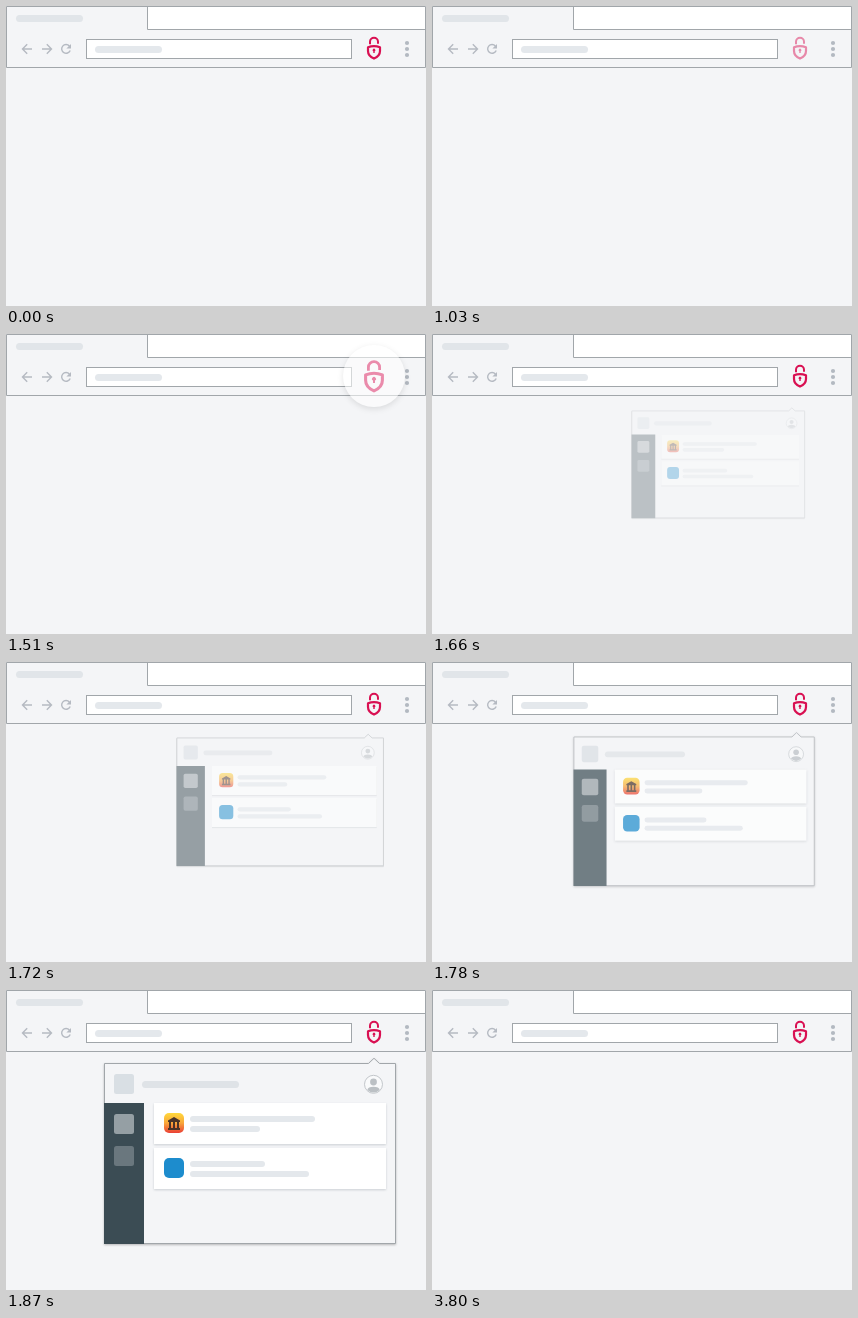
Recreate the animation shown at these times as an HTML page. Size 420 by 300 pixels, loop 3.9 s.

```html
<!DOCTYPE html>
<html lang="en">
<head>
<meta charset="utf-8">
<title>Browser extension popup</title>
<style>
html, body { margin: 0; height: 100%; overflow: hidden; background: #f4f5f7; }
svg { display: block; }
.line { stroke: #a1a6aa; }
.nav { fill: none; stroke: #b5bac2; stroke-width: 1.4; }
.pill { fill: #e4e8ec; }
.card { fill: #fff; filter: drop-shadow(0 1px 1px rgba(60, 75, 85, .22)); }
#halo { fill: #fff; filter: drop-shadow(0 2px 3px rgba(0, 0, 0, .2)); }
#frame { fill: #f4f5f7; filter: drop-shadow(0 1px 1px rgba(0, 0, 0, .25)); }
</style>
</head>
<body>
<svg width="420" height="300" viewBox="0 0 420 300">
  <defs>
    <linearGradient id="sunset" x2="0" y2="1">
      <stop stop-color="#ffd93b"/>
      <stop offset=".5" stop-color="#f9a63a"/>
      <stop offset="1" stop-color="#ea3f35"/>
    </linearGradient>
  </defs>

  <!-- browser window -->
  <path fill="#fff" d="M142 1H419V23H142z"/>
  <path class="line" fill="none" d="M.5 .5H419.5V61.5H.5zM141.5 .5V23.5H419.5"/>
  <rect class="pill" x="10" y="9" width="67" height="7" rx="3.5" style="fill:#e1e5e9"/>
  <rect class="line" fill="#fff" x="80.5" y="33.5" width="265" height="19"/>
  <rect class="pill" x="89" y="40" width="67" height="7" rx="3.5"/>
  <g class="nav">
    <path d="M26 43H16.8M21.2 38.3L16.5 43L21.2 47.7"/>
    <path d="M36 43H45.2M40.8 38.3L45.5 43L40.8 47.7"/>
    <path d="M63.4 40A4.4 4.4 0 1 0 64.2 44.4"/>
  </g>
  <path fill="#b5bac2" d="M65 38V42.6H60.4z"/>
  <g fill="#b3b9c1">
    <circle cx="401" cy="37" r="2.1"/>
    <circle cx="401" cy="43" r="2.1"/>
    <circle cx="401" cy="49" r="2.1"/>
  </g>

  <!-- toolbar button -->
  <circle id="halo" cx="368" cy="42" r="31"/>
  <g id="lock" fill="none" stroke="#d91052" stroke-width="2">
    <path d="M364 38.3V35.8A4 4 0 0 1 372 35.8V37.8"/>
    <path stroke-width="2.2" stroke-linejoin="round" d="M362 41.2Q368 38.9 374 41.2V45Q374 50 368 52.6Q362 50 362 45z"/>
    <path fill="#d91052" stroke="none" d="M367.3 47V45.3A1.4 1.4 0 1 1 368.7 45.3V47z"/>
  </g>

  <!-- popup -->
  <g id="popup">
    <path id="frame" class="line" d="M98.5 73.5H362.5L368 68.3L373.5 73.5H389.5V253.5H98.5z"/>
    <path fill="#3b4c54" d="M98 113H138V254H98z"/>
    <rect x="108" y="84" width="20" height="20" rx="2.5" fill="#d9dfe4"/>
    <rect class="pill" x="136" y="91" width="97" height="7" rx="3.5" style="fill:#dfe3e7"/>
    <rect x="108" y="124" width="20" height="20" rx="2.5" fill="#959fa4"/>
    <rect x="108" y="156" width="20" height="20" rx="2.5" fill="#6a777e"/>
    <circle cx="367.5" cy="94.3" r="9" fill="#f9fafb" stroke="#c3c7cb"/>
    <g fill="#bbc0c4">
      <circle cx="367.5" cy="92" r="3.4"/>
      <path d="M361.3 100Q362 96.8 367.5 96.8T373.7 100Q367.5 105 361.3 100z"/>
    </g>
    <rect class="card" x="148" y="113" width="232" height="41"/>
    <rect class="card" x="148" y="158" width="232" height="41"/>
    <rect x="158" y="123" width="20" height="20" rx="5" fill="url(#sunset)"/>
    <path fill="#4a3327" d="M162 130.5L168 127L174 130.5V132H162zM163 132H165V138H163zM167 132H169V138H167zM171 132H173V138H171zM162 138H174V140H162z"/>
    <rect x="158" y="168" width="20" height="20" rx="5" fill="#1d8ccd"/>
    <g class="pill">
      <rect x="184" y="126" width="125" height="6" rx="3"/>
      <rect x="184" y="136" width="70" height="6" rx="3"/>
      <rect x="184" y="171" width="75" height="6" rx="3"/>
      <rect x="184" y="181" width="119" height="6" rx="3"/>
    </g>
  </g>
</svg>
<script>
const LOOP = 3900, PRESS = 1030, RELEASE = 1540, OPEN = 1570, CLOSE = 3800, STEP = 30;
const [halo, lock, popup] = ['halo', 'lock', 'popup'].map(id => document.getElementById(id));
const progress = (t, from, to) => Math.min(1, Math.max(0, (t - from) / (to - from)));

function pose(el, x, y, scale, opacity) {
  el.setAttribute('transform', `translate(${x} ${y}) scale(${scale}) translate(${-x} ${-y})`);
  el.setAttribute('opacity', opacity);
}

function draw(now) {
  let t = now % LOOP;
  if (t >= PRESS && t < CLOSE) t = PRESS + Math.floor((t - PRESS) / STEP) * STEP;

  const pressed = t >= PRESS && t < OPEN;
  const grow = pressed ? progress(t, PRESS, RELEASE - STEP) : 0;
  pose(halo, 368, 42, grow, pressed && t < RELEASE ? 0.55 : 0);
  pose(lock, 368, 42, 1 + 0.4 * grow, pressed ? 0.47 : 1);

  const open = now % LOOP < CLOSE ? progress(t, OPEN, OPEN + 300) : 0;
  pose(popup, 348, 82, 0.42 + 0.58 * open, open);
}

const start = performance.now();
function tick() {
  draw(performance.now() - start);
  requestAnimationFrame(tick);
}
tick();
</script>
</body>
</html>
```
